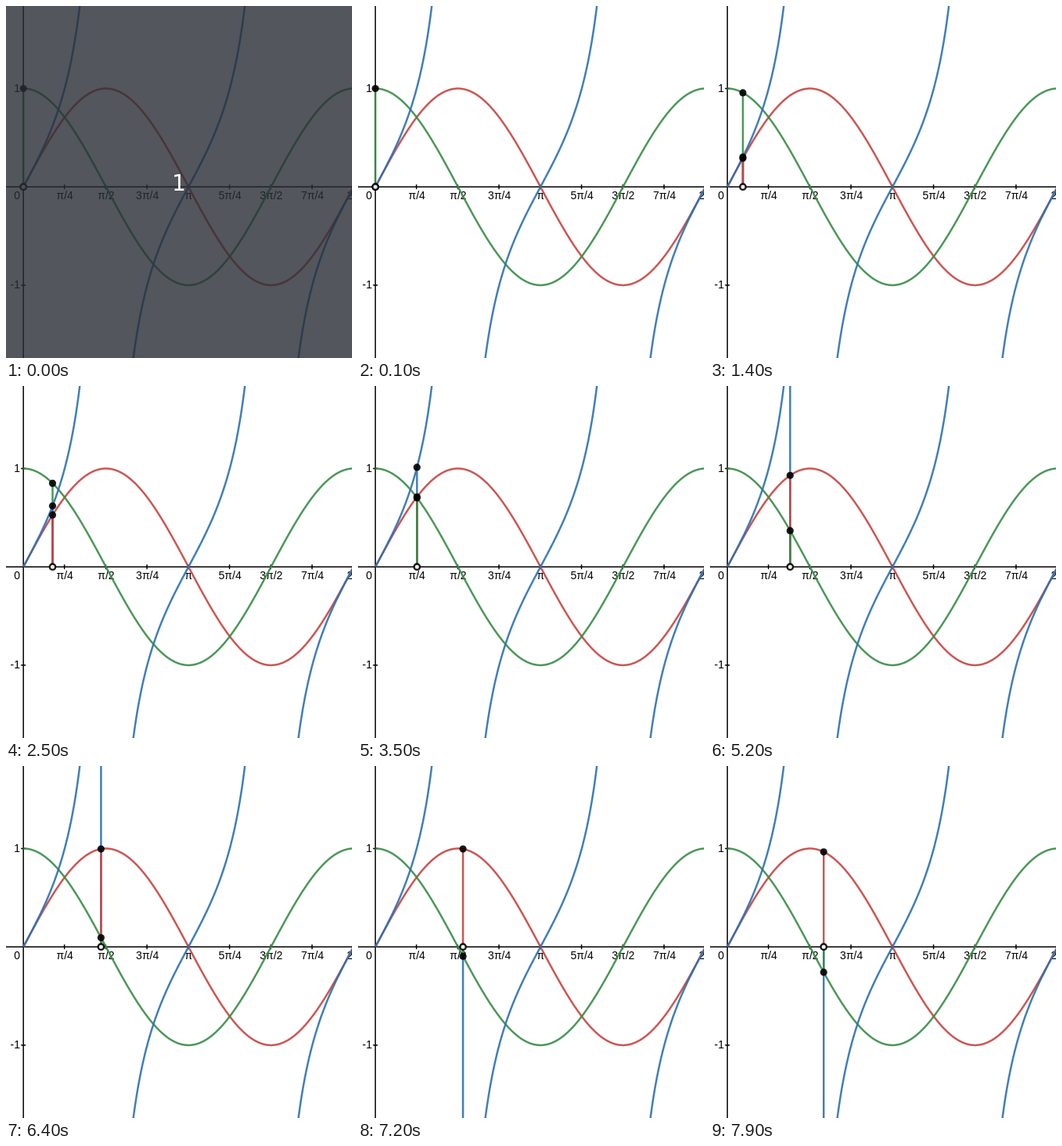
Recreate the animation shown at these times as an HTML page with a canvas. Size 442 by 450 pixels, loop 8000 ms.

```html
<!DOCTYPE html>
<html lang="en">
<head>
<meta charset="utf-8">
<title>Sine, cosine and tangent</title>
<style>
  html, body { margin: 0; width: 442px; height: 450px; overflow: hidden; background: #fff; }
  canvas { display: block; }
</style>
</head>
<body>
<canvas id="stage" width="442" height="450"></canvas>
<script>
const W = 442, H = 450, LOOP = 8000;
const OX = 22.2, OY = 231.2;          // origin
const UX = 210.9 / Math.PI, UY = 125.7; // pixels per unit
const ctx = document.getElementById('stage').getContext('2d');

const curves = [
  { fn: Math.sin, color: '#c74440' },
  { fn: Math.cos, color: '#388c46' },
  { fn: Math.tan, color: '#2d70b3' }
];
const labels = ['π/4', 'π/2', '3π/4', 'π', '5π/4', '3π/2', '7π/4', '2π'];

const px = x => OX + x * UX;
const py = y => OY - y * UY;

function line(x1, y1, x2, y2) {
  ctx.beginPath();
  ctx.moveTo(x1, y1);
  ctx.lineTo(x2, y2);
  ctx.stroke();
}

function label(text, x, y, align) {
  ctx.textAlign = align;
  ctx.strokeStyle = '#fff';
  ctx.lineWidth = 3;
  ctx.strokeText(text, x, y);
  ctx.fillText(text, x, y);
}

function drawAxes() {
  ctx.strokeStyle = '#000';
  ctx.lineWidth = 1.5;
  line(0, OY, W, OY);
  line(OX, 0, OX, H);

  ctx.font = '14px "Liberation Sans", Arial, sans-serif';
  ctx.fillStyle = '#000';
  ctx.lineJoin = 'round';
  labels.forEach((text, i) => label(text, px((i + 1) * Math.PI / 4) + 0.3, 247, 'center'));
  label('0', 18, 247, 'right');
  label('1', 18, 110, 'right');
  label('-1', 18, 361, 'right');

  ctx.strokeStyle = '#000';
  ctx.lineWidth = 1.5;
  labels.forEach((_, i) => {
    const x = px((i + 1) * Math.PI / 4) - 0.3;
    line(x, OY - 3, x, OY + 3);
  });
  for (const v of [1, -1]) line(OX - 3, py(v), OX + 3, py(v));
}

function drawCurve({ fn, color }) {
  ctx.strokeStyle = color;
  ctx.lineWidth = 2.5;
  ctx.beginPath();
  let pen = false;
  for (let sx = OX; sx <= W + 2; sx += 0.25) {
    const y = py(fn((sx - OX) / UX));
    if (y < -60 || y > H + 60) { pen = false; continue; }
    if (pen) ctx.lineTo(sx, y); else ctx.moveTo(sx, y);
    pen = true;
  }
  ctx.stroke();
}

function disc(x, y, r) {
  ctx.beginPath();
  ctx.arc(x, y, r, 0, Math.PI * 2);
  ctx.fill();
}

function drawMarker(sx) {
  const x = (sx - OX) / UX;
  const bars = curves.map(c => ({ color: c.color, v: c.fn(x) }));
  // Longest bar first, so shorter ones stay visible
  bars.sort((a, b) => Math.abs(b.v) - Math.abs(a.v));
  ctx.lineWidth = 2.5;
  for (const b of bars) {
    ctx.strokeStyle = b.color;
    line(sx, OY, sx, Math.max(-20, Math.min(H + 20, py(b.v))));
  }
  ctx.fillStyle = '#000';
  for (const b of bars) disc(sx, py(b.v), 4.6);

  ctx.fillStyle = '#fff';
  disc(sx, OY, 3.8);
  ctx.strokeStyle = '#000';
  ctx.lineWidth = 2.4;
  ctx.beginPath();
  ctx.arc(sx, OY, 3.7, 0, Math.PI * 2);
  ctx.stroke();
}

function drawCountdown() {
  ctx.fillStyle = 'rgba(40, 44, 52, 0.8)';
  ctx.fillRect(0, 0, W, H);
  ctx.fillStyle = '#fff';
  ctx.font = '28px "DejaVu Sans", Verdana, sans-serif';
  ctx.textAlign = 'center';
  ctx.fillText('1', W / 2, 236);
}

function draw(ms) {
  const t = Math.floor(ms / 100) * 100;
  ctx.globalAlpha = 1;
  ctx.fillStyle = '#fff';
  ctx.fillRect(0, 0, W, H);
  drawAxes();
  ctx.globalAlpha = 0.9;
  curves.forEach(drawCurve);
  drawMarker(Math.max(OX, 42 + (t - 1400) * 0.01588));
  ctx.globalAlpha = 1;
  if (t < 100) drawCountdown();
}

const start = performance.now();
function tick() {
  draw((performance.now() - start) % LOOP);
  requestAnimationFrame(tick);
}
tick();
</script>
</body>
</html>
```
